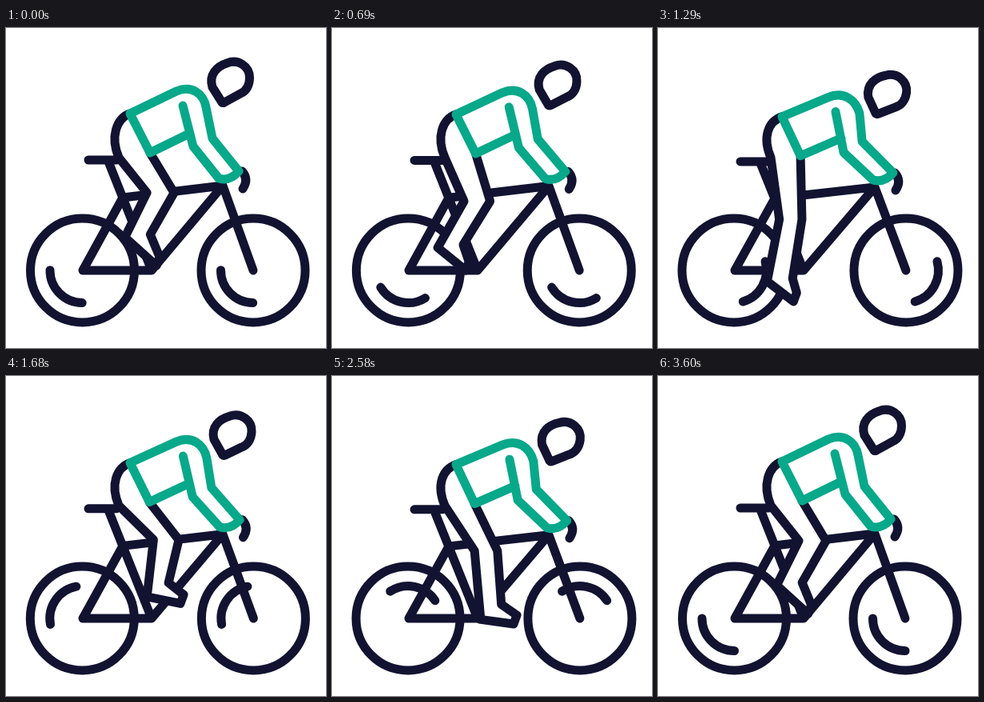
An HTML page with a canvas for the animation above (3.63 s loop, 400 px wide and 400 px high).

```html
<!DOCTYPE html>
<html lang="en">
<head>
<meta charset="utf-8">
<title>Cyclist</title>
<style>
  html, body { margin: 0; width: 100%; height: 100%; overflow: hidden; background: #fff; }
  canvas { display: block; }
</style>
</head>
<body>
<canvas id="stage" width="400" height="400"></canvas>
<script>
const ctx = document.getElementById('stage').getContext('2d');
const DARK = '#121331', GREEN = '#08a88a';
const LOOP = 3630, END = 3600, TURNS = 4;
const { PI, sin, cos, max } = Math;

// Steady turns, then an ease-out that comes to rest after the last one
function turns(t, period, easeStart, power) {
  if (t < easeStart) return t / period;
  const left = max(0, (END - t) / (END - easeStart));
  return TURNS - (TURNS - easeStart / period) * left ** power;
}

function shape(path, color = DARK, filled = false) {
  const p = new Path2D(path);
  if (filled) ctx.fill(p);
  ctx.strokeStyle = color;
  ctx.stroke(p);
}

function wheel(x, angle) {
  ctx.strokeStyle = DARK;
  for (const [r, from, sweep] of [[65, 0, 2 * PI], [40.5, angle, PI / 2]]) {
    ctx.beginPath();
    ctx.arc(x, 303, r, from, from + sweep);
    ctx.stroke();
  }
}

function drawFrame(dip) {
  const y = 2 * dip;
  shape(`M${309 + dip} 303L271 ${197 + y}L182 303H96L146 ${212 + dip}L271 ${197 + y}
    M182 303L128 ${167 + y}M103 ${165 + y}H138`);
  shape(`M${295 + dip} ${179 + y}q9 10 1 22`);
}

// The ankle circles with the pedal; the knee swings and the foot tilts with it
function drawLeg(crank, dip) {
  const c = cos(crank), s = sin(crank);
  const kneeX = 183 + 10 * c + 14 * s, kneeY = 222 - 16 * c - 10 * s;
  const ankleX = 171 + 28 * cos(crank - 1.815), ankleY = 291 + 32 * sin(crank - 1.815);
  const pitch = 1.01 - .56 * max(0, s);
  const reach = 32 + 12 * max(0, c) ** 4;
  const toeX = ankleX + reach * cos(pitch), toeY = ankleY + reach * sin(pitch);
  const heelX = 16 * cos(pitch - 1.12), heelY = 16 * sin(pitch - 1.12);
  const half = 17 - 3 * dip, hip = 4 * dip;
  shape(`M155 ${107 + hip}C138 ${113 + hip} 130 136 141 162
    L${kneeX - half} ${kneeY}L${ankleX - heelX} ${ankleY - heelY}L${toeX} ${toeY}l4 -11
    L${ankleX + heelX} ${ankleY + heelY}L${kneeX + half} ${kneeY}
    L${180 - 2 * dip} ${156 + hip}`, DARK, true);
}

function drawTorso(dip) {
  const hip = 4 * dip, shoulder = 8 * dip;
  shape(`M229 ${132 + 1.5 * hip}L${180 - 2 * dip} ${156 + hip}L155 ${107 + hip}L213 ${79 + shoulder}
    C232 ${71 + shoulder} 247 ${82 + shoulder} ${250 + 2 * dip} ${99 + shoulder}
    L${258 - 3 * dip} ${138 + hip}L${291 + 3 * dip} ${179 + 2 * dip}q-11 13 -25 9
    L${234 - 2 * dip} ${148 + shoulder}L${221 + dip} ${97 + shoulder}`, GREEN, true);
}

function drawHead(dip) {
  ctx.save();
  ctx.translate(281 + 6 * dip, 66 + 16.5 * dip);
  ctx.rotate(.14 * dip);
  shape('M-11 27L-23 8C-28-8-17-18-5-22C9-28 23.5-18 23.5-4C23.5 6 19 13 12 16L-8 27Q-10 28-11 27Z');
  ctx.restore();
}

function draw(t) {
  const spin = PI / 2 + 2 * PI * turns(t, 757, 2520, 2.13);
  const crank = 2 * PI * turns(t, 780, 2580, 1.28);
  const dip = 1 - cos(crank / 2) ** 4;

  ctx.clearRect(0, 0, 400, 400);
  ctx.fillStyle = '#fff';
  ctx.lineWidth = 11;
  ctx.lineCap = ctx.lineJoin = 'round';

  wheel(95.5 - dip / 2, spin);
  wheel(309 + dip, spin);
  drawFrame(dip);
  drawLeg(crank, dip);
  drawTorso(dip);
  drawHead(dip);
}

function tick() {
  draw(performance.now() % LOOP);
  requestAnimationFrame(tick);
}
tick();
</script>
</body>
</html>
```
